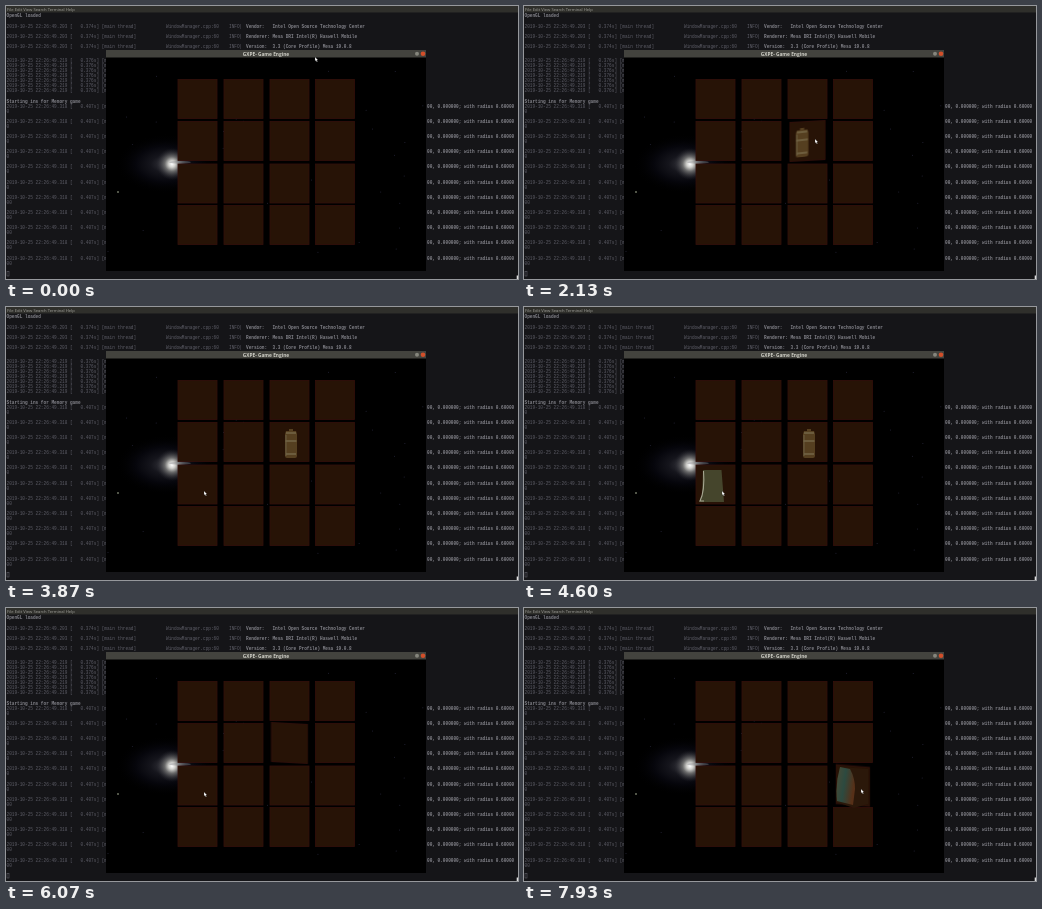
These frames come from a looping animation (512 by 273 pixels, 8000 ms). An HTML page:

```html
<!DOCTYPE html>
<html lang="en">
<head>
<meta charset="utf-8">
<title>Memory game</title>
<style>
html, body { margin: 0; width: 100%; height: 100%; overflow: hidden; background: #000; }
svg { display: block; width: 100vw; height: 100vh; }
text { white-space: pre; }
.log { font: 4.42px "Liberation Mono", monospace; fill: #5f5f69; }
.bright { fill: #83838a; font-weight: bold; }
.ui { font: 4.2px "Open Sans", sans-serif; fill: #a0a09a; }
.title { font: bold 4.8px "Open Sans", sans-serif; fill: #cfcfc6; text-anchor: middle; }
.card { fill: #271306; stroke: #34100a; stroke-width: .8; }
.turn, .pic { transform-box: fill-box; transform-origin: center; animation: 8s linear infinite; }
#turnA { animation-name: turnA; }
#turnB { animation-name: turnB; }
#turnC { animation-name: turnC; }
#picA { animation-name: picA; }
#picB { animation-name: picB; }
#picC { animation-name: picC; }
#cursor { animation: point 8s infinite ease-in-out; }

@keyframes point {
  0%, 3% { transform: translate(309px, 51px); }
  12%, 16% { transform: translate(308px, 112px); }
  23%, 30% { transform: translate(291px, 133px); }
  39%, 77% { transform: translate(198px, 184px); }
  93%, 100% { transform: translate(337px, 181px); }
}
@keyframes turnA {
  0%, 22.5% { transform: none; }
  24.5% { transform: scaleX(.04) skewY(8deg); }
  26.6% { transform: scaleX(.9) skewY(-3deg); }
  29%, 69% { transform: none; }
  72.5% { transform: scaleX(.04) skewY(-8deg); }
  75.9% { transform: scaleX(.93) skewY(3deg); }
  77%, 100% { transform: none; }
}
@keyframes turnB {
  0%, 52% { transform: none; }
  54.5% { transform: scaleX(.04) skewY(8deg); }
  57%, 69% { transform: none; }
  72.5% { transform: scaleX(.04) skewY(-8deg); }
  75.5%, 100% { transform: none; }
}
@keyframes turnC {
  0%, 95.5% { transform: none; }
  97.5% { transform: scaleX(.04) skewY(8deg); }
  99.1%, 100% { transform: scaleX(.86) skewY(4deg); }
}
@keyframes picA {
  0%, 24.49% { opacity: 0; transform: translateX(-3px) scaleX(.05); }
  24.5% { opacity: 1; transform: translateX(-3px) scaleX(.05); }
  26.6% { opacity: 1; transform: translateX(-7px) scaleX(1.05) skewY(-7deg); }
  29%, 69% { opacity: 1; transform: none; }
  72.5% { opacity: 1; transform: scaleX(.05); }
  72.51%, 100% { opacity: 0; transform: scaleX(.05); }
}
@keyframes picB {
  0%, 54.49% { opacity: 0; transform: scaleX(.05); }
  54.5% { opacity: 1; transform: scaleX(.05); }
  57%, 69% { opacity: 1; transform: none; }
  72.5% { opacity: 1; transform: scaleX(.05); }
  72.51%, 100% { opacity: 0; transform: scaleX(.05); }
}
@keyframes picC {
  0%, 97.49% { opacity: 0; transform: scaleX(.05); }
  97.5% { opacity: 1; transform: scaleX(.05); }
  99.1%, 100% { opacity: 1; transform: none; }
}
</style>
</head>
<body>
<svg viewBox="0 0 512 273" preserveAspectRatio="none">
  <defs>
    <radialGradient id="halo">
      <stop offset="0" stop-color="#38383f"/>
      <stop offset=".3" stop-color="#15151c"/>
      <stop offset=".6" stop-color="#06060c"/>
      <stop offset="1" stop-color="#000" stop-opacity="0"/>
    </radialGradient>
    <radialGradient id="core">
      <stop offset="0" stop-color="#fff"/>
      <stop offset=".2" stop-color="#d2d2ce"/>
      <stop offset=".45" stop-color="#6c6c6c"/>
      <stop offset="1" stop-color="#24242c" stop-opacity="0"/>
    </radialGradient>
    <linearGradient id="leaf" x2="1" y2=".3">
      <stop offset="0" stop-color="#4a4a34"/>
      <stop offset=".5" stop-color="#2c4a40"/>
      <stop offset="1" stop-color="#573018"/>
    </linearGradient>
    <clipPath id="game"><path d="M100 52H420V265H100Z"/></clipPath>
  </defs>

  <rect width="512" height="273" fill="#151518"/>
  <rect width="512" height="6.5" fill="#2f2f2b"/>
  <text class="ui" x="1" y="4.7">File Edit View Search Terminal Help</text>
  <g id="terminal"></g>
  <rect x="1" y="265.5" width="2" height="4.5" fill="none" stroke="#6a6a72" stroke-width=".5"/>
  <rect x="510.7" y="269.5" width="1.3" height="3.5" fill="#ddd"/>

  <rect x="100" y="44" width="320" height="221" fill="#000"/>
  <rect x="100" y="44" width="320" height="7.5" fill="#43433e"/>
  <text class="title" x="260" y="49.5">GXPE- Game Engine</text>
  <circle cx="411" cy="47.7" r="2" fill="#85857c"/>
  <circle cx="417" cy="47.7" r="2.3" fill="#d24f2a"/>

  <g clip-path="url(#game)">
    <g id="stars" fill="#26263a"></g>
    <circle cx="112" cy="186" r="1" fill="#6c7260"/>
    <ellipse cx="160" cy="158" rx="50" ry="30" fill="url(#halo)"/>
    <circle cx="166" cy="158" r="16" fill="url(#core)"/>
    <ellipse cx="174" cy="156.3" rx="11" ry="1.5" fill="#85858a" opacity=".4"/>
    <g id="cards"></g>

    <g id="picA" class="pic">
      <path d="M280 124H283V122H287V124H290L291 127V149Q291 151 289 151H281Q279 151 279 149V127Z" fill="#553f20"/>
      <path d="M280 126H290M279.5 134H290.5M280 147H290" stroke="#8a8060" stroke-width=".9"/>
      <path d="M280 128V149" stroke="#70664c" stroke-width=".8"/>
    </g>
    <g id="picB" class="pic">
      <path d="M179 163H197.5L200 195H175L178 188Z" fill="#45452c"/>
      <path d="M179.5 164Q181 184 176 194H180" fill="none" stroke="#a5a590" stroke-width="1.1"/>
    </g>
    <g id="picC" class="pic">
      <path d="M316 159L344 161V196L330 200L312 194Z" fill="#2b180a"/>
      <path d="M316 159L326 161Q331 170 331 181L329 197L313 193Q311 176 316 159Z" fill="url(#leaf)"/>
    </g>
  </g>

  <path id="cursor" d="M0 0V4.2L1 3.3L1.8 5L2.6 4.6L1.9 3H3Z" fill="#fff" stroke="#222" stroke-width=".25"/>
</svg>
<script>
const SVG = "http://www.w3.org/2000/svg";
const byId = id => document.getElementById(id);

function add(parent, tag, attributes, content = "") {
  const node = document.createElementNS(SVG, tag);
  for (const [key, value] of Object.entries(attributes)) node.setAttribute(key, value);
  node.textContent = content;
  parent.append(node);
  return node;
}

const print = (x, y, content, style = "") =>
  add(byId("terminal"), "text", { x, y: y + 1.5, class: "log " + style }, content);

function stamp(y, millis, seconds) {
  print(0.5, y, `2019-10-25 22:26:49.${millis} [   ${seconds}s] [main thread]`);
}

print(0.5, 9, "OpenGL loaded", "bright");
[
  "Vendor:   Intel Open Source Technology Center",
  "Renderer: Mesa DRI Intel(R) Haswell Mobile",
  "Version:  3.3 (Core Profile) Mesa 19.0.8"
].forEach((info, i) => {
  const y = 20 + i * 10;
  stamp(y, 203, "0.374");
  print(160, y, "WindowManager.cpp:60");
  print(223, y, "INFO|");
  print(240, y, info, "bright");
});
for (let i = 0; i < 7; i++) stamp(54.5 + i * 5.07, 219, "0.376");
print(0.5, 95, "Starting ins for Memory game", "bright");
for (let i = 0; i < 11; i++) {
  const y = 100 + i * 15.2;
  stamp(y, 318, "0.407");
  print(0.5, y + 5.1, i < 6 ? "0" : "00");
  print(421, y, "00, 0.000000; with radius 0.60000", "bright");
}

const columns = [172, 218, 264, 309.5], rows = [73.5, 115.5, 158, 199.5];
const turning = { "2,1": "turnA", "0,2": "turnB", "3,2": "turnC" };
rows.forEach((y, row) => columns.forEach((x, column) => {
  const card = add(byId("cards"), "rect", { x, y, width: 39, height: 39, class: "card" });
  const id = turning[[column, row]];
  if (id) {
    card.id = id;
    card.classList.add("turn");
  }
}));

let seed = 7;
const random = () => (seed = seed * 16807 % 2147483647) / 2147483647;
for (let i = 0; i < 45; i++) {
  add(byId("stars"), "circle", { cx: 102 + random() * 316, cy: 54 + random() * 208, r: 0.5 });
}
</script>
</body>
</html>
```
